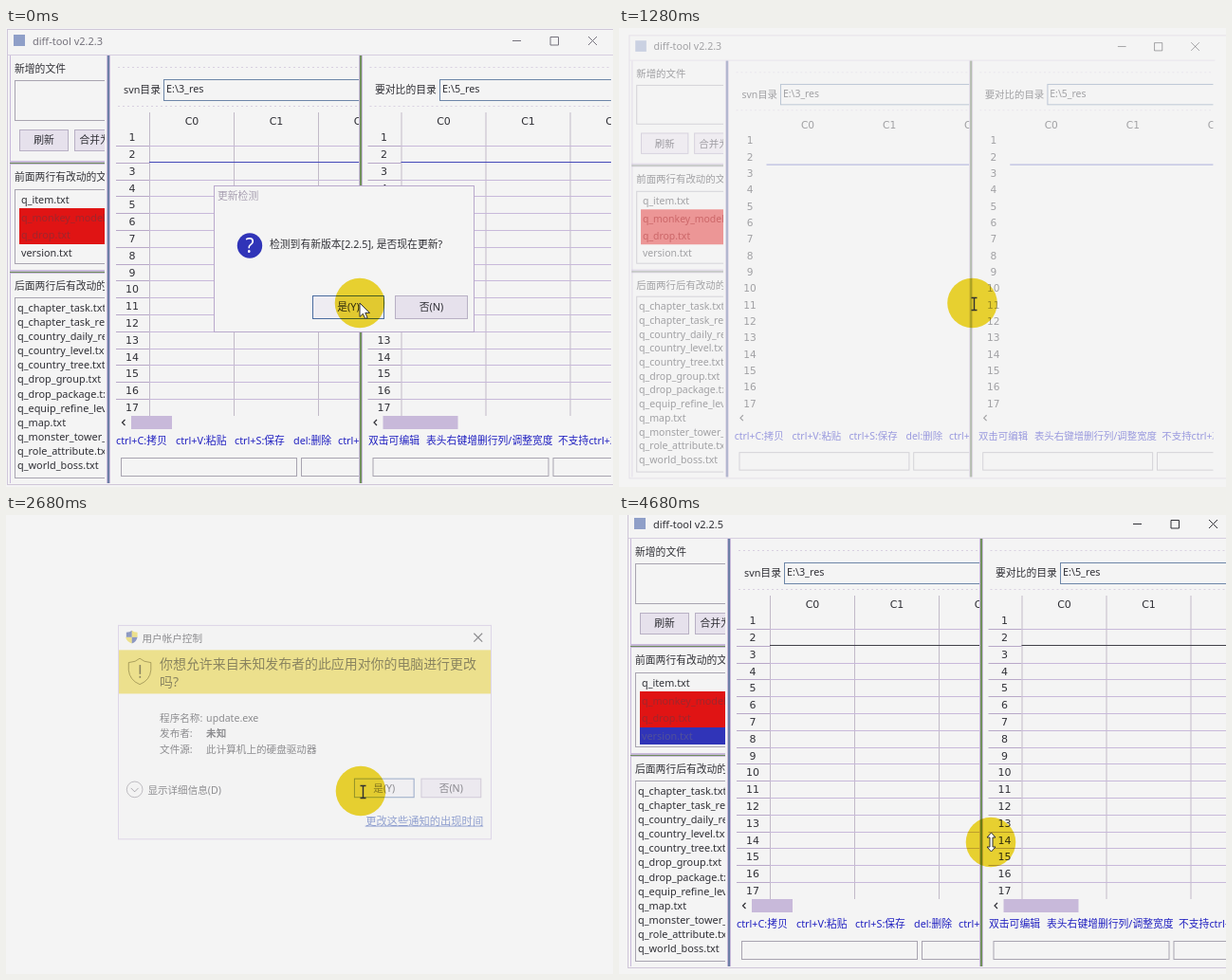
Recreate the animation shown at these times as an HTML page with a canvas. Size 640 by 484 pixels, loop 8000 ms.

```html
<!DOCTYPE html>
<html lang="zh-CN">
<head>
<meta charset="utf-8">
<title>diff-tool update</title>
<style>
html, body { margin: 0; width: 100%; height: 100%; overflow: hidden; background: #f4f4f4; }
canvas { display: block; }
</style>
</head>
<body>
<canvas id="stage" width="640" height="484"></canvas>
<script>
const ctx = document.getElementById('stage').getContext('2d');
const FONT = "'Noto Sans', 'Noto Sans CJK SC', 'Noto Sans CJK', sans-serif";
const TABLE_FONT = "'DejaVu Sans', sans-serif";
const BG = '#f4f4f4', INK = '#303036', LILAC = '#c8b9da', GREY = '#a8a4b0',
      BLUE = '#3034b8', RED = '#e01414', YELLOW = '#e6cf30', STEEL = '#6d86a8';

function text(str, x, y, { color = INK, size = 10.8, weight = 400, align = 'left', family = FONT } = {}) {
  ctx.font = `${weight} ${size}px ${family}`;
  ctx.textAlign = align;
  ctx.fillStyle = color;
  ctx.fillText(str, x, y + size * 0.37);
}

function fill(x1, y1, x2, y2, color) {
  ctx.fillStyle = color;
  ctx.fillRect(x1, y1, x2 - x1, y2 - y1);
}

function box(x1, y1, x2, y2, stroke, background) {
  if (background) fill(x1, y1, x2, y2, background);
  ctx.strokeStyle = stroke;
  ctx.lineWidth = 1;
  ctx.strokeRect(x1 + 0.5, y1 + 0.5, x2 - x1 - 1, y2 - y1 - 1);
}

function path(d, { stroke, background, width = 1 }) {
  const p = new Path2D(d);
  if (background) { ctx.fillStyle = background; ctx.fill(p); }
  if (stroke) { ctx.strokeStyle = stroke; ctx.lineWidth = width; ctx.stroke(p); }
}

function circle(x, y, r, background, stroke) {
  ctx.beginPath();
  ctx.arc(x, y, r, 0, 7);
  if (background) { ctx.fillStyle = background; ctx.fill(); }
  if (stroke) { ctx.strokeStyle = stroke; ctx.lineWidth = 1; ctx.stroke(); }
}

function clipped(x1, y1, x2, y2, draw) {
  ctx.save();
  ctx.beginPath();
  ctx.rect(x1, y1, x2 - x1, y2 - y1);
  ctx.clip();
  draw();
  ctx.restore();
}

function placed(sx, sy, dx, dy, alpha, draw) {
  ctx.save();
  ctx.transform(sx, 0, 0, sy, dx, dy);
  ctx.globalAlpha = alpha;
  draw();
  ctx.restore();
}

function button(label, x1, y1, x2, y2, focused) {
  box(x1, y1, x2, y2, focused ? '#4a6ca0' : '#b8b0c4', focused ? '#eeecf2' : '#e6e1ec');
  text(label, (x1 + x2) / 2, (y1 + y2) / 2, { align: 'center' });
}

const changedFiles = ['q_item.txt', 'q_monkey_model.txt', 'q_drop.txt', 'version.txt'];
const otherFiles = ['chapter_task', 'chapter_task_reward', 'country_daily_reward', 'country_level',
  'country_tree', 'drop_group', 'drop_package', 'equip_refine_level', 'map',
  'monster_tower_level', 'role_attribute', 'world_boss'];

function sidebar(updated) {
  const divider = y => {
    fill(4, y, 104, y + 4, LILAC);
    fill(4, y + 2, 104, y + 3, '#6f8f5c');
  };
  fill(4, 29, 5, 480, LILAC);
  text('新增的文件', 9, 43);
  box(9, 55, 130, 98, GREY);
  button('刷新', 14, 107, 66, 130);
  button('合并为一', 72, 107, 126, 130);
  divider(140);
  text('前面两行有改动的文件', 9, 157);
  box(9, 170, 130, 249, GREY);
  fill(14, 190, 104, 228, RED);
  if (updated) fill(14, 228, 104, 246, BLUE);
  changedFiles.forEach((name, i) => {
    const onRed = i === 1 || i === 2;
    const color = onRed ? '#a0262c' : i === 3 && updated ? '#50509a' : INK;
    text(name, 16, 181 + i * 18.7, { color });
  });
  divider(255);
  text('后面两行后有改动的文件', 9, 272);
  box(9, 284, 130, 475, GREY);
  otherFiles.forEach((name, i) => text(`q_${name}.txt`, 12, 295 + i * 15.09, { size: 10.9 }));
}

// Both tables share one layout; the right one is moved sideways.
function table({ label, labelX, inputX, folder, right, thumb, hints, updated, faded }) {
  const rowY = n => 115 + (n - 1) * 17.81;
  ctx.setLineDash([2, 3]);
  path(`M118 41.5H${right}M118 82.5H${right}`, { stroke: '#d8d0e0' });
  ctx.setLineDash([]);
  text(label, labelX, 65);
  box(inputX, 54, right + 30, 77, STEEL);
  text(folder, inputX + 3, 64);

  for (let col = 0; col < 3; col++) {
    const x = 151 + col * 89;
    if (!faded) fill(x, 89, x + 1, 409, '#c2bac8');
    text('C' + col, 196 + col * 89, 98, { align: 'center', size: 11, family: TABLE_FONT });
  }
  for (let n = 1; n <= 17; n++) {
    text(n, 133, rowY(n), { align: 'center', size: 11, family: TABLE_FONT });
    if (faded || n === 17) continue;
    const y = Math.round(rowY(n) + 8.9);
    fill(116, y, 151, y + 1, '#b8a8c8');
    if (n !== 2) fill(151, y, right, y + 1, LILAC);
  }
  fill(151, 141, right, 142, updated ? '#404048' : '#4448b8');

  path('M125.5 413L122.5 416L125.5 419', { stroke: INK, width: 1.2 });
  if (!faded) fill(132, 409, thumb, 423, LILAC);
  for (const [hint, x] of hints) text(hint, x, 435, { color: '#2020c0' });
  box(121, 453, 307, 473, GREY);
  box(311, 453, 420, 473, GREY);
}

function splitter(x, color) {
  fill(x - 2, 29, x + 2, 480, LILAC);
  fill(x - 1, 29, x + 1, 480, color);
}

function mainWindow({ version = '2.2.3', active = true, updated = false, faded = false } = {}) {
  const titleInk = active ? INK : '#75727c';
  box(1, 1, 660, 482, '#cfc6d8', BG);
  fill(8, 7, 20, 19, '#8f9fc8');
  text('diff-tool v' + version, 28, 13.5, { color: titleInk, size: 11 });
  path('M534 13.5H543M574 9.5H582.5V18H574ZM614 9L623 18M623 9L614 18', { stroke: titleInk });
  fill(2, 28, 640, 29, '#d6cee0');

  clipped(2, 29, 104, 481, () => sidebar(updated));
  clipped(111, 29, 372, 481, () => table({
    label: 'svn目录', labelX: 124, inputX: 166, folder: 'E:\\3_res', right: 372, thumb: 175,
    hints: [['ctrl+C:拷贝', 116], ['ctrl+V:粘贴', 179], ['ctrl+S:保存', 241], ['del:删除', 303], ['ctrl+Z', 350]],
    updated, faded
  }));
  clipped(377, 29, 638, 481, () => {
    ctx.translate(265.5, 0);
    table({
      label: '要对比的目录', labelX: 123.5, inputX: 191.5, folder: 'E:\\5_res', right: 373, thumb: 211,
      hints: [['双击可编辑', 116.5], ['表头右键增删行列/调整宽度', 177.5], ['不支持ctrl+Z', 316.5]],
      updated, faded
    });
  });
  splitter(108, '#6c7fa6');
  splitter(374, '#71905c');
}

function updateDialog() {
  box(219, 166, 494, 321, '#b9a9cc', BG);
  text('更新检测', 223, 177, { color: '#a9a0b2' });
  circle(257, 229.5, 13.2, BLUE);
  text('?', 257, 229.5, { color: '#fff', size: 21, align: 'center' });
  text('检测到有新版本[2.2.5], 是否现在更新?', 278, 228.5);
  button('是(Y)', 323, 282, 399, 307, true);
  button('否(N)', 410, 282, 487, 307);
}

function accountPrompt() {
  box(114, 114, 516, 345, LILAC, BG);
  clipped(122, 127, 129, 134, () => path('M122 120h14v6q-1 6-7 8q-6-2-7-8Z', { background: YELLOW }));
  path('M123 122q4 0 6-2v7h-6ZM129 127h6q-1 5-6 7Z', { background: '#2f4796' });
  path('M129 120q2 2 6 2v5h-6Z', { background: YELLOW });
  text('用户帐户控制', 140, 128);
  path('M497 123L506 132M506 123L497 132', { stroke: INK, width: 1.2 });

  fill(115, 141, 515, 188, YELLOW);
  path('M137.5 150q4 4 12 4.500v8q-1 11-12 15.500q-11-4.500-12-15.500v-8q8-.5 12-4.500Z', { stroke: '#6b6230' });
  fill(137, 157, 138.6, 167, INK);
  fill(137, 169, 138.6, 171, INK);
  text('你想允许来自未知发布者的此应用对你的电脑进行更改', 159, 156, { size: 14.2 });
  text('吗?', 159, 175, { size: 14.2 });

  const details = [['程序名称:', 'update.exe'], ['发布者:', '未知'], ['文件源:', '此计算机上的硬盘驱动器']];
  details.forEach(([key, value], i) => {
    text(key, 159, 214 + i * 17);
    text(value, 209, 214 + i * 17, { weight: i === 1 ? 700 : 400 });
  });
  circle(132, 291, 8.5, null, '#8a8690');
  path('M128 289.500L132 293.500L136 289.500', { stroke: '#6a6670' });
  text('显示详细信息(D)', 146, 291.5);
  button('是(Y)', 368, 279, 433, 300, true);
  button('否(N)', 440, 279, 505, 300);
  text('更改这些通知的出现时间', 507, 325, { color: '#3a56b0', align: 'right', size: 11.5 });
  fill(380, 330, 507, 331, '#3a56b0');
}

const cursorShapes = {
  arrow: (x, y) => path(`M${x} ${y}v14.500l3.400-3.200l2.300 5.200l2.400-1l-2.300-5.100h4.700Z`,
    { stroke: '#303030', background: '#fff' }),
  beam: (x, y) => path(`M${x - 3} ${y - 6.5}h6M${x} ${y - 6.5}v13M${x - 3} ${y + 6.5}h6`,
    { stroke: '#303030', width: 1.4 }),
  resize: (x, y) => path(`M${x} ${y - 10}l4.500 5h-3v10h3l-4.500 5l-4.500-5h3v-10h-3Z`,
    { stroke: '#303030', background: '#fff' })
};

function pointer(shape, x, y, tipX, tipY) {
  ctx.globalCompositeOperation = 'multiply';
  circle(x, y, 26.3, '#f2da32');
  ctx.globalCompositeOperation = 'source-over';
  cursorShapes[shape](tipX, tipY);
}

const updatedWindow = () =>
  placed(1, 1, 8, -4, 1, () => mainWindow({ version: '2.2.5', updated: true }));

// Each scene holds from its start until the next one.
const scenes = [
  [0, () => {
    mainWindow({ active: false });
    updateDialog();
    pointer('arrow', 373, 290, 373, 290);
  }],
  [80, () => {
    mainWindow({ active: false });
    placed(0.98, 0.98, 7.1, 4.9, 0.5, updateDialog);
    pointer('arrow', 373, 290, 373, 290);
  }],
  [680, () => {
    mainWindow();
    pointer('arrow', 373, 290, 373, 290);
  }],
  [1280, () => {
    placed(0.967, 0.973, 9.5, 6.4, 0.42, () => mainWindow({ faded: true }));
    pointer('beam', 372.5, 290, 374.5, 291);
  }],
  [2080, () => {
    accountPrompt();
    pointer('arrow', 374, 291, 375, 290.5);
  }],
  [2680, () => {
    placed(0.98, 0.98, 6.3, 4.2, 0.52, accountPrompt);
    pointer('beam', 374, 291, 376.5, 292);
  }],
  [3680, () => {
    updatedWindow();
    pointer('arrow', 392, 66, 393.5, 66);
  }],
  [4680, () => {
    updatedWindow();
    pointer('resize', 392, 345, 392.5, 345);
  }]
];

function frame() {
  const t = performance.now() % 8000;
  fill(0, 0, 640, 484, BG);
  scenes.findLast(([start]) => t >= start)[1]();
  requestAnimationFrame(frame);
}
frame();
</script>
</body>
</html>
```
